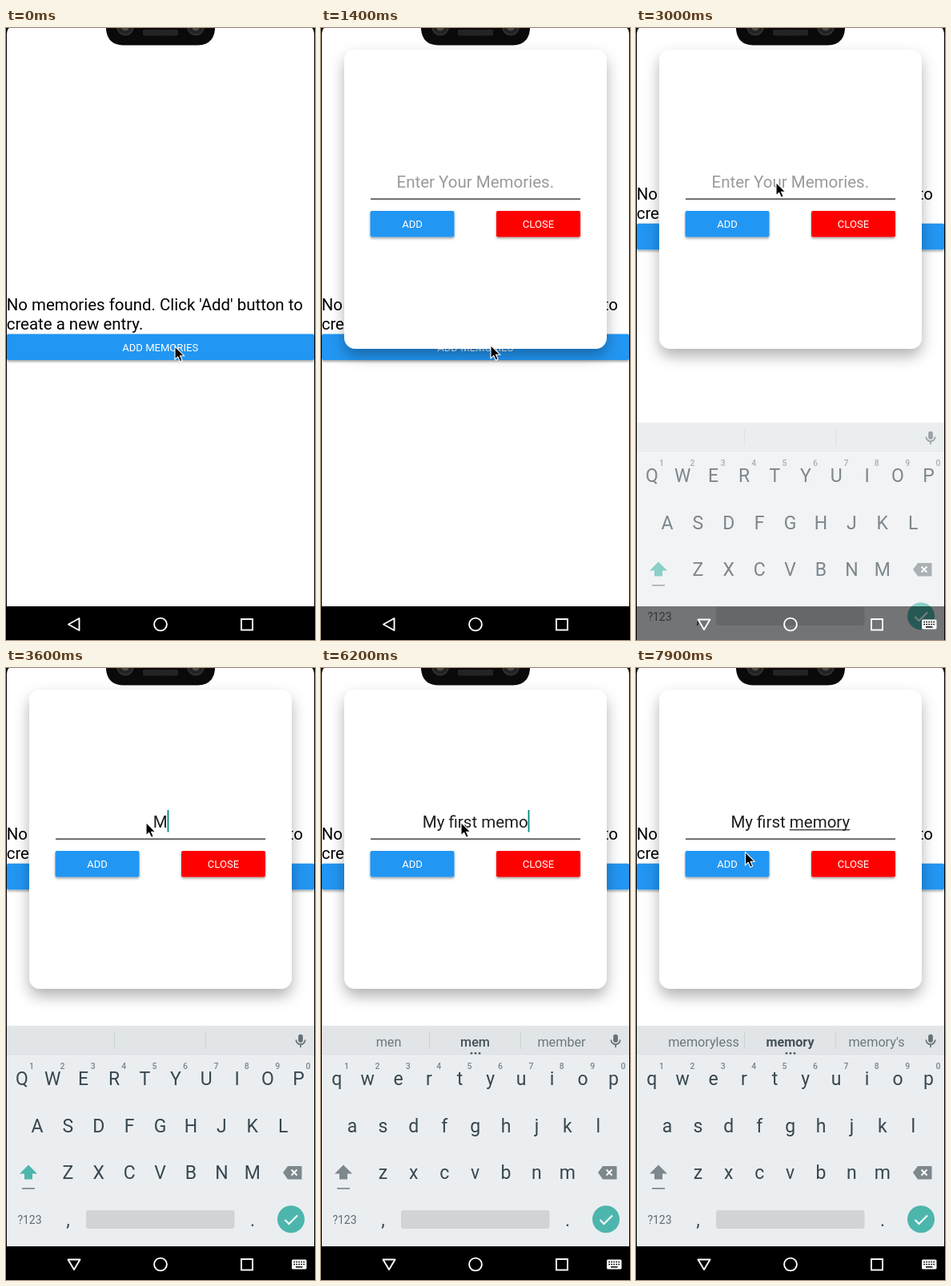
Write an HTML page that moves like this. It is 386 px wide and 763 px high and loops after 8000 ms.

```html
<!DOCTYPE html>
<html lang="en">
<head>
<meta charset="utf-8">
<title>Memories app</title>
<style>
  html, body { margin: 0; width: 100%; height: 100%; overflow: hidden; background: #000; }
  svg { display: block; width: 386px; height: 763px; font-family: Roboto, "Open Sans", sans-serif; }
  text { white-space: pre; }
  .mid { text-anchor: middle; }
  .btn { font-size: 13.07px; fill: #fff; text-anchor: middle; }
  .body { font-size: 20.45px; }
  .input { font-size: 20.53px; fill: #1f1f1f; }
  .key { font-size: 23px; fill: #37474f; text-anchor: middle; }
  .hint { font-size: 10.5px; font-weight: 500; fill: #78868c; text-anchor: middle; }
  .word { font-size: 16.2px; fill: #6b777c; text-anchor: middle; }
</style>
</head>
<body>
<svg viewBox="0 0 386 763" xmlns="http://www.w3.org/2000/svg">
  <defs>
    <filter id="low" x="-10%" y="-30%" width="120%" height="180%">
      <feDropShadow dx="0" dy="2" stdDeviation="1.5" flood-opacity=".35"/>
    </filter>
    <filter id="high" x="-15%" y="-15%" width="130%" height="135%">
      <feDropShadow dx="0" dy="9" stdDeviation="9" flood-opacity=".3"/>
    </filter>
    <clipPath id="screen"><path d="M1 721V9Q1 2 4 0H382Q385 2 385 9V721Z"/></clipPath>
    <clipPath id="button"><rect x="1" y="381.5" width="384" height="32.5"/></clipPath>
    <pattern id="mesh" width="3" height="3" patternUnits="userSpaceOnUse">
      <rect width="3" height="3" fill="#141414"/>
      <circle cx="1" cy="1" r=".8" fill="#484848"/>
      <circle cx="2.5" cy="2.5" r=".7" fill="#3a3a3a"/>
    </pattern>
  </defs>

  <rect width="386" height="763"/>
  <g clip-path="url(#screen)">
    <rect width="386" height="721" fill="#fff"/>
    <g id="page">
      <text class="body" x=".7" y="352">No memories found. Click 'Add' button to</text>
      <text class="body" x=".7" y="376">create a new entry.</text>
      <rect x="1" y="381.5" width="384" height="32.5" rx="2" fill="#2196f3" filter="url(#low)"/>
      <circle id="ripple" cx="201" cy="398" fill="#fff" opacity=".15" clip-path="url(#button)"/>
      <text class="btn" x="192.7" y="403">ADD MEMORIES</text>
    </g>
  </g>

  <g id="card">
    <rect x="29" y="27" width="328" height="373" rx="14" fill="#fff" filter="url(#high)"/>
    <rect x="62" y="212.6" width="262" height="1.1"/>
    <rect x="61.5" y="228" width="105" height="32.6" rx="2" fill="#2196f3" filter="url(#low)"/>
    <text class="btn" x="114" y="249.3">ADD</text>
    <rect x="219" y="228" width="105" height="32.6" rx="2" fill="#f00" filter="url(#low)"/>
    <text class="btn" x="271.5" y="249.3">CLOSE</text>
    <text id="entry" class="input" y="199"></text>
    <rect id="under" y="201.2" height="1.2" fill="#1f1f1f"/>
    <rect id="caret" y="177" width="1.8" height="27.5" fill="#00897b"/>
  </g>

  <g id="board">
    <rect x="1" y="446" width="384" height="275" fill="#ebeef1"/>
    <rect x="1" y="446" width="384" height="37" fill="#e1e5e8"/>
    <rect x="1" y="483" width="384" height="1" fill="#f2f4f6"/>
    <path d="M135.5 454V475M249.5 454V475" stroke="#cdd2d5"/>
    <g fill="none" stroke="#657177" stroke-width="1.7">
      <rect x="366" y="457.5" width="4" height="8.5" rx="2" fill="#657177"/>
      <path d="M362.3 463.5a5.7 5.7 0 0 0 11.4 0M368 469V473"/>
    </g>
    <g id="words"></g>
    <g id="dots" fill="#455a64">
      <circle cx="188" cy="480.3" r="1.4"/><circle cx="193" cy="480.3" r="1.4"/><circle cx="198" cy="480.3" r="1.4"/>
    </g>
    <g id="keys"></g>
    <path id="shift" d="M28 619.5L39 630.5H33V637.5H23V630.5H17Z"/>
    <rect x="20" y="648" width="16" height="1.7" fill="#7d888d"/>
    <path d="M346 629L352 621H369.5V637.5H352Z" fill="#7d888d"/>
    <path d="M356.5 625.5L363.5 632.5M363.5 625.5L356.5 632.5" stroke="#fff" stroke-width="1.8"/>
    <text class="mid" x="29.5" y="692.5" font-size="14" fill="#5f6b70">?123</text>
    <text class="key" x="77.5" y="696">,</text>
    <rect x="100" y="676" width="185.5" height="23" rx="3" fill="#d0d4d7"/>
    <text class="key" x="308" y="696">.</text>
    <circle cx="356" cy="687.3" r="17" fill="#4db6ac"/>
    <path d="M348.5 688L353.5 693L364 682.5" fill="none" stroke="#fff" stroke-width="2"/>
  </g>

  <rect y="721" width="386" height="42" opacity=".25"/>
  <g fill="none" stroke="#fff" stroke-width="1.9" stroke-linejoin="round">
    <path id="back"/>
    <circle cx="193" cy="743.5" r="7.9"/>
    <rect x="294" y="737" width="14" height="13.5" stroke-linejoin="miter"/>
  </g>
  <g id="ime">
    <rect x="357" y="737.5" width="18.5" height="12" rx="1.5" fill="#fff"/>
    <path d="M359.3 740.5H374M359.3 743.5H374" stroke="#000" stroke-width="1.7" stroke-dasharray="1.7 1.3"/>
    <path d="M362 746.8H370.5" stroke="#000" stroke-width="1.5"/>
  </g>

  <path d="M125 0V2Q127 21 146 21.5H240Q259 21 261 2V0Z" fill="#0a0a0a"/>
  <g fill="#222" stroke="#303030" stroke-width="2">
    <circle cx="149" cy="-1.5" r="10"/><circle cx="237" cy="-1.5" r="10"/>
  </g>
  <g fill="#4a4a48"><circle cx="149" cy="-1" r="4.5"/><circle cx="237" cy="-1" r="4.5"/></g>
  <rect x="171" y="2" width="44" height="7.5" rx="2" fill="url(#mesh)"/>

  <path id="cursor" d="M0 0V16.2L3.7 12.8L6.4 18.8L9.2 17.5L6.6 11.7H11.6Z" stroke="#fff" stroke-width="1.1"/>
</svg>

<script>
const LOOP = 8000, STEP = 100, MID = 192.8, HINT = 'Enter Your Memories.';
const $ = id => document.getElementById(id);
const set = (el, attrs) => { for (const k in attrs) el.setAttribute(k, attrs[k]); };
const show = (el, on) => { el.style.display = on ? '' : 'none'; };
const move = (el, x, y) => el.setAttribute('transform', `translate(${x} ${y})`);

function label(parent, cls, x, y, str) {
  const el = document.createElementNS('http://www.w3.org/2000/svg', 'text');
  set(el, { class: cls, x, y });
  el.textContent = str;
  return parent.appendChild(el);
}

const letters = [];
[['QWERTYUIOP', 19.8, 520], ['ASDFGHJKL', 39, 579], ['ZXCVBNM', 77.4, 637.3]].forEach(([row, x, y], r) => {
  [...row].forEach((ch, i) => {
    letters.push(label($('keys'), 'key', x + i * 38.4, y, ch));
    if (!r) label($('keys'), 'hint', 32 + i * 38.4, 499.5, (i + 1) % 10);
  });
});
const words = [84.5, 192.5, 300.5].map(x => label($('words'), 'word', x, 471.5, ''));
set(words[1], { style: 'fill:#455158' });

// Typing: time, text, caret, last word underlined
const typing = [
  [0, '', 0, 0], [2300, '', 1, 0], [2900, '', 0, 0], [3300, '', 1, 0],
  [3600, 'M', 1, 0], [3900, 'My', 1, 1], [4200, 'My ', 1, 0], [4500, 'My fi', 1, 1],
  [4800, 'My first', 1, 1], [5300, 'My first', 0, 1], [5600, 'My first ', 1, 0],
  [5800, 'My first m', 1, 0], [5900, 'My first me', 1, 0], [6000, 'My first mem', 1, 0],
  [6200, 'My first memo', 1, 0], [6700, 'My first memor', 1, 1],
  [6900, 'My first memory', 1, 0], [7200, 'My first memory', 1, 1], [7600, 'My first memory', 0, 1]
];
// Suggestions: time, words, weight of the middle one, dots
const hints = [
  [0, '  ', 400, 0], [3900, 'Mu My Myth', 700, 1], [4500, 'for fi first', 500, 1],
  [4800, 'firstly first firsts', 700, 1], [5800, '  ', 500, 0],
  [6200, 'men mem member', 500, 1], [6700, 'memory memo memories', 500, 1],
  [7200, 'memoryless memory memory\'s', 700, 1]
];
// Cursor paths: start, steps, from, to
const paths = [
  [100, 1, [211, 397], [212, 395.5]],
  [1700, 4, [212, 395.5], [175, 192.5]],
  [7600, 4, [175, 192.5], [136.5, 229.5]]
];
// Ripple radius, card offset, keyboard offset and opacity
const ripples = [[0, 0], [800, 22], [900, 39], [1000, 0]];
const slides = [[0, 763], [1200, 420], [1300, 110], [1400, 0]];
const rises = [[0, 330, 0], [2900, 62, .25], [3000, 46, .65], [3100, 20, .85], [3200, 5, .96], [3300, 0, 1]];

const at = (table, t) => table.filter(row => row[0] <= t).pop();
const ctx = document.createElement('canvas').getContext('2d');
ctx.font = '20.53px Roboto, "Open Sans", sans-serif';
const width = str => ctx.measureText(str).width;

function cursorAt(t) {
  let pos = paths[0][2];
  for (const [start, steps, a, b] of paths) {
    if (t < start) break;
    const p = Math.min(1, ((t - start) / STEP + 1) / steps), e = p * p * (3 - 2 * p);
    pos = a.map((v, i) => v + (b[i] - v) * e);
  }
  return pos;
}

function drawEntry(t) {
  const [, text, caret, line] = at(typing, t);
  const shown = text || HINT, left = MID - width(shown.trimEnd()) / 2;
  $('entry').textContent = shown;
  set($('entry'), { x: left, style: text ? '' : 'fill:#9a9a9a' });
  set($('caret'), { x: left + width(text) - .2 });
  show($('caret'), caret);
  const lead = width(text.slice(0, text.lastIndexOf(' ') + 1));
  set($('under'), { x: left + lead, width: Math.max(0, width(text) - lead) });
  show($('under'), line);
}

function drawBoard(t) {
  const [, y, alpha] = at(rises, t);
  move($('board'), 0, y);
  set($('board'), { opacity: alpha });
  const upper = t < 3900;
  letters.forEach(el => {
    const ch = el.textContent;
    el.textContent = upper ? ch.toUpperCase() : ch.toLowerCase();
  });
  set($('shift'), { fill: upper ? '#4db6ac' : '#7d888d' });
  const [, list, weight, dots] = at(hints, t);
  list.split(' ').forEach((w, i) => { words[i].textContent = w; });
  words[1].style.fontWeight = weight;
  show($('dots'), dots);
}

function draw(time) {
  const t = Math.floor(time % LOOP / STEP) * STEP, open = t >= 2900;
  move($('page'), 0, open ? -137.7 : 0);
  set($('ripple'), { r: at(ripples, t)[1] });
  move($('card'), 0, at(slides, t)[1]);
  show($('card'), t >= 1200);
  set($('back'), { d: open ? 'M77.5 737.5H92.5L85 750Z' : 'M78 743.5L91.5 736V751Z' });
  show($('ime'), open);
  move($('cursor'), ...cursorAt(t));
  drawEntry(t);
  drawBoard(t);
}

const begin = performance.now();
function tick() {
  draw(performance.now() - begin);
  requestAnimationFrame(tick);
}
tick();
</script>
</body>
</html>
```
